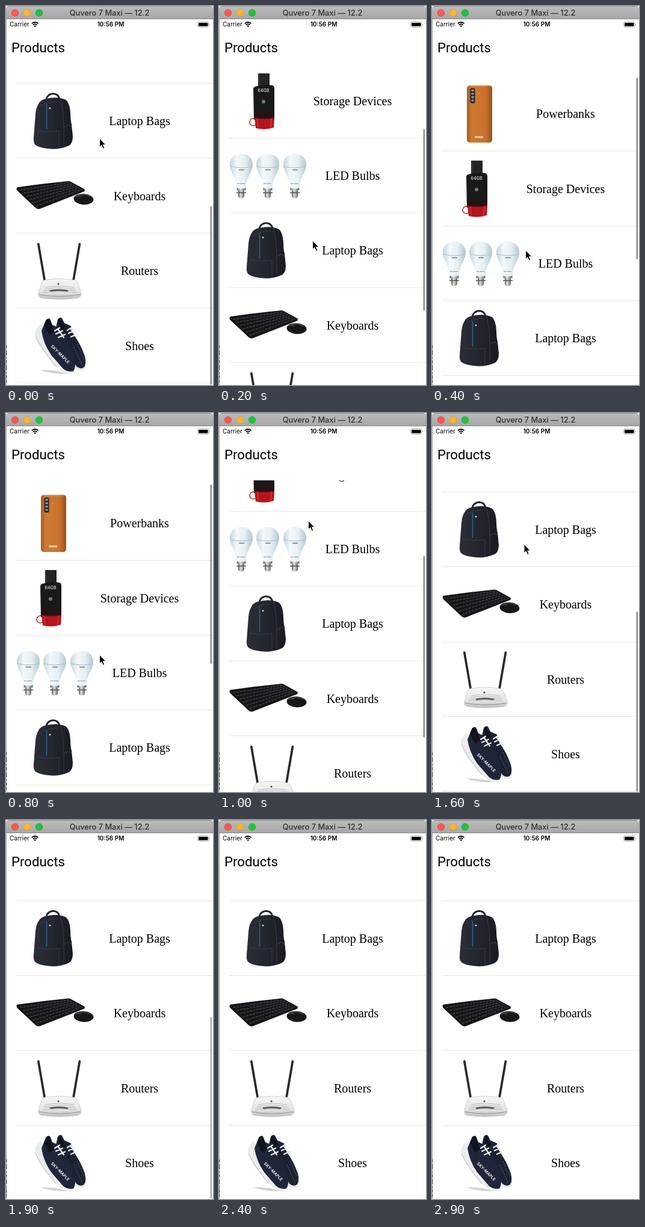
Write an HTML page that moves like this. It is 344x630 px and loops after 3 s.

```html
<!DOCTYPE html>
<html lang="en">
<head>
<meta charset="utf-8">
<title>Product list</title>
<style>
html, body { margin: 0; width: 100%; height: 100%; overflow: hidden; background: #fff; }
svg { display: block; width: 344px; height: 630px; }
.ui { font-family: Inter, Roboto, sans-serif; }
.head { font: 22.2px Roboto, Inter, sans-serif; }
.label { font: 20px "Liberation Serif", "Noto Serif", serif; text-anchor: middle; }
</style>
</head>
<body>
<svg id="stage" viewBox="0 0 344 630">
  <defs>
    <clipPath id="view"><rect x="0" y="112" width="344" height="518"/></clipPath>
    <linearGradient id="bar" x2="0" y2="1"><stop stop-color="#bcbcbc"/><stop offset="1" stop-color="#a6a6a6"/></linearGradient>
    <linearGradient id="copper"><stop stop-color="#a95b20"/><stop offset=".2" stop-color="#cf7a34"/><stop offset=".75" stop-color="#c8712c"/><stop offset="1" stop-color="#97501c"/></linearGradient>
    <linearGradient id="glass"><stop stop-color="#c3d3dc"/><stop offset=".3" stop-color="#f3f8fa"/><stop offset=".65" stop-color="#e6eff3"/><stop offset="1" stop-color="#b4c6d0"/></linearGradient>
    <linearGradient id="metal"><stop stop-color="#5d5d5d"/><stop offset=".4" stop-color="#e2e2e2"/><stop offset="1" stop-color="#636363"/></linearGradient>
    <linearGradient id="cloth"><stop stop-color="#2b2d37"/><stop offset=".5" stop-color="#23252f"/><stop offset="1" stop-color="#191a21"/></linearGradient>
    <linearGradient id="shell" x2="0" y2="1"><stop stop-color="#f6f6f6"/><stop offset=".65" stop-color="#e4e4e4"/><stop offset="1" stop-color="#bdbdbd"/></linearGradient>
  </defs>
  <rect width="344" height="630" fill="#fff"/>
  <g clip-path="url(#view)"><g id="list"></g></g>
  <rect id="thumb" x="339.5" width="2.6" rx="1.3" fill="#8c8c8c"/>

  <path d="M0.5 22V630" stroke="#a2a2a2"/>
  <path d="M0.5 564V626" stroke="#2b2b2b" stroke-dasharray="5 3 8 4 2 3"/>
  <path d="M0 22V5Q0 0 5 0H339Q344 0 344 5V22Z" fill="url(#bar)"/>
  <path d="M4 .5H340" stroke="#8d8d8d"/>
  <path d="M0 21.5H344" stroke="#8b8b8b"/>
  <g stroke-width=".6">
    <circle cx="15" cy="11.5" r="5.8" fill="#fc554f" stroke="#d8423d"/>
    <circle cx="35" cy="11.5" r="5.8" fill="#fdb52a" stroke="#d99720"/>
    <circle cx="55" cy="11.5" r="5.8" fill="#1fc13c" stroke="#1aa232"/>
  </g>
  <g class="ui">
    <text x="172" y="16" font-size="12.8" font-weight="500" fill="#303030" text-anchor="middle">Quvero 7 Maxi — 12.2</text>
    <text x="6" y="34" font-size="10">Carrier</text>
    <text x="174" y="34" font-size="10" font-weight="600" text-anchor="middle">10:56 PM</text>
  </g>
  <g fill="none" stroke="#000" stroke-width="1.7">
    <path d="M42.8 29.2Q48.2 24.8 53.6 29.2M44.8 31.5Q48.2 28.7 51.6 31.5"/>
  </g>
  <path d="M46.3 32.9Q48.2 31.5 50.1 32.9L48.2 35Z"/>
  <rect x="318.5" y="26.5" width="18.5" height="8.5" rx="2.4" fill="none" stroke="#8a8a8a" stroke-width=".8"/>
  <rect x="320" y="28" width="15.5" height="5.5" rx="1.2"/>
  <path d="M338.2 29.3Q340 30.7 338.2 32.1Z" fill="#8a8a8a"/>
  <text class="head" x="9" y="77">Products</text>
  <path id="cursor" d="M0 0V14.6L3.3 11.6L5.8 17.2L8.2 16.2L5.8 10.7H10.4Z" stroke="#fff" stroke-width="1"/>
</svg>
<script>
const LOOP = 3000, TICK = 100;
const PITCH = 124.4;
const TOP = 241, BOTTOM = -114.5;   // resting limits of the first divider
const $ = id => document.getElementById(id);
const range = n => [...Array(n).keys()];
const mix = (a, b, k) => a + (b - a) * k;

const powerbank = () => `
  <rect x="58" y="15.5" width="42" height="95" rx="5" fill="url(#copper)"/>
  <path d="M62 16.6H96" stroke="#e0a068"/>
  <rect x="63.5" y="20" width="8" height="25" rx="2.5" fill="#25201f"/>
  ${range(4).map(i => `<rect x="65.2" y="${22 + i * 5.6}" width="4.6" height="3.4" rx=".8" fill="#8094a6"/>`).join("")}
  <circle cx="78" cy="29" r=".8" fill="#e9b588"/>
  <rect x="71" y="99.5" width="14" height="3.4" fill="#eed0b2" opacity=".85"/>`;

const flashDrive = () => `
  <circle cx="57" cy="98" r="6" fill="none" stroke="#bc343a" stroke-width="1.7"/>
  <path d="M65 16H84V39H65Z" fill="#242424"/>
  <path d="M67 17V38" stroke="#444"/>
  <path d="M60 39Q74 34 89 37Q92 38 92 42L92 94H58L57 43Q57 40 60 39Z" fill="#19191b"/>
  <path d="M59 91Q75 87 92 90L91 107Q76 112 61 108Z" fill="#b5141c"/>
  <path d="M60 81L91 80L91 91Q75 94 60 91Z" fill="#241315"/>
  <path d="M64 93L65 107M87 92L86 108" stroke="#e0383c" stroke-width="1.3"/>
  <text class="ui" x="74" y="48" font-size="7" font-weight="600" fill="#c5c5c5" text-anchor="middle">64GB</text>
  <circle cx="74" cy="64" r="3" fill="#77777a"/>`;

const bulb = x => `<g transform="translate(${x} 0)">
  <path d="M-5 85H5V96Q5 100 0 100Q-5 100 -5 96Z" fill="url(#metal)"/>
  <path d="M-7.5 82H7.5V87H-7.5Z" fill="url(#metal)"/>
  <path d="M-8 91H8" stroke="#555" stroke-width="1.6"/>
  <path d="M0 26C12 26 19 34 19 44C19 57 9 63 7.5 83Q0 85 -7.5 83C-9 63 -19 57 -19 44C-19 34 -12 26 0 26Z" fill="url(#glass)"/>
  <path d="M-18.5 47Q0 52 18.5 47" stroke="#a9bcc7" fill="none"/>
  <path d="M-4 53H5" stroke="#6b7e8c" stroke-width="1.6"/>
  <path d="M-7 76H8" stroke="#8fa3ae" stroke-width="1.4" stroke-dasharray="4 1 8"/>
</g>`;

const bulbs = () => [37, 81, 126].map(bulb).join("");

const bag = () => `
  <path d="M67 26Q69 18 78 17Q87 17 89 26" fill="none" stroke="#23252e" stroke-width="3"/>
  <path d="M54 34Q57 27 68 25Q86 21 99 27Q106 32 107 50Q107 61 109 68L111 88Q111 101 103 104Q91 109 78 109Q58 108 50 103Q45 100 46 90L49 51Q50 40 54 34Z" fill="url(#cloth)"/>
  <path d="M90 25Q97 45 96 103M51 78Q69 82 88 79V107M57 38Q67 30 86 30" fill="none" stroke="#3a3c47" stroke-width="1"/>
  <path d="M96 73Q103 66 109 72" fill="none" stroke="#42444f"/>
  <path d="M67.5 34V76" stroke="#23638c" stroke-width="1.7"/>
  <circle cx="73" cy="41" r="1.5" fill="#c5ccd4"/>`;

function keyRow(i) {
  const k = (i + 0.7) / 6.2;
  const from = [mix(20, 53, k), mix(49, 82, k)];
  const to = [mix(103, 128, k), mix(38.5, 53, k)];
  return `<path d="M${from}L${to}" stroke="#35353b" stroke-width="2.2" stroke-dasharray="4.2 1.4"/>`;
}

const keyboard = () => `
  <path d="M19 48Q60 42 102 38Q105 37.5 108 39L130 51Q132 53 130 55L56 84Q53 85 50 83L19 54Q16 50 19 48Z" fill="#151518"/>
  ${range(6).map(keyRow).join("")}
  <g transform="rotate(4 129 68)">
    <ellipse cx="129" cy="68" rx="16.5" ry="9" fill="#17171a"/>
    <path d="M115 65Q127 57 140 63" fill="none" stroke="#505055" stroke-width="1.2"/>
    <ellipse cx="122" cy="63.5" rx="3.5" ry="1.2" fill="#3a3a3e"/>
  </g>`;

const antenna = (x, lean) => `
  <path d="M${x} 18L${x + lean * 10.5} 79" stroke="#29292b" stroke-width="3.7" stroke-linecap="round"/>`;

const router = () => `
  ${antenna(53.8, 1)}${antenna(122.4, -1)}
  <path d="M64 78Q88 74 113 78Q117 79 119 83L125 99Q126 106 119 108Q88 112 59 108Q52 106 54 99L59 83Q60 79 64 78Z" fill="url(#shell)" stroke="#c4c4c4" stroke-width=".8"/>
  <path d="M55 102Q88 108 124 102" fill="none" stroke="#8f8f8f"/>
  ${range(4).map(i => `<path d="M${65 - i * 1.6} ${90 + i * 3}Q88 ${86 + i * 3} ${113 + i * 1.6} ${90 + i * 3}" fill="none" stroke="#b8b8b8" stroke-width=".9"/>`).join("")}
  <path d="M72 95Q88 91.5 104 95L102 97.5Q88 95 74 97.5Z" fill="#58585a"/>
  <circle cx="87" cy="84.5" r="1.6" fill="#555"/>`;

const laces = (x, y) => `
  <g transform="translate(${x} ${y})" stroke="#efefef" stroke-width="2.2" stroke-linecap="round">
    <path d="M0 5L8 0M2 10L13 5M6 16L17 11M6 3L15 16"/>
  </g>`;

const shoes = () => `
  <path d="M57 103Q80 102 104 109Q78 111 57 103Z" fill="#d2d2d4"/>
  <path d="M86 28L94 52L116 100Q124 107 131 102L133 95L120 62Z" fill="#e6e6e8"/>
  <path d="M83 32L86 19Q89 14 93 17L97 25L108 30L113 45Q124 60 131 80Q134 92 130 98Q124 103 117 97L100 68Z" fill="#1d2233"/>
  <path d="M58 27Q48 33 48 44Q51 57 62 71L84 97Q95 109 108 109Q115 108 114 100L84 62Z" fill="#ececee"/>
  <path d="M49 46Q56 65 83 97" fill="none" stroke="#c6c6ca" stroke-width="1.2"/>
  <path d="M59 38L66 21Q69 16 73 18L77 28L90 34L97 49Q109 65 114 84Q117 98 112 105Q103 107 95 101L75 78Q62 59 59 38Z" fill="#20263a"/>
  <path d="M63 29L67 19L73 19L80 39L72 46Z" fill="#12141d"/>
  <path d="M86 23L90 18L98 31L94 40Z" fill="#12141d"/>
  ${laces(81, 33)}${laces(102, 32)}
  <path d="M118 60L130 86M113 66L127 96" stroke="#555e76" stroke-width="1.1" stroke-dasharray="2 2"/>
  <text class="ui" transform="translate(74 64) rotate(45)" font-size="6.8" font-weight="700" fill="#e6e6e6">SKY-MAPLE</text>`;

const products = [
  ["Powerbanks", powerbank],
  ["Storage Devices", flashDrive],
  ["LED Bulbs", bulbs],
  ["Laptop Bags", bag],
  ["Keyboards", keyboard],
  ["Routers", router],
  ["Shoes", shoes]
];

$("list").innerHTML = products.map(([name, draw], i) => `
  <g transform="translate(0 ${(i - 1) * PITCH})">
    ${draw()}
    <text class="label" x="222" y="69.5">${name}</text>
    <path d="M17 ${PITCH}H344" stroke="#e6e6e6"/>
  </g>`).join("");

// [time, divider position]
const scroll = [
  [0, -120], [100, -28], [200, 95], [300, 196], [400, 241], [500, 262], [600, 261],
  [700, 252], [800, 245], [900, 150], [1000, 39], [1100, -90], [1200, -150],
  [1300, -141], [1400, -130], [1500, -122], [1600, -117.5], [1700, -115.3], [1800, BOTTOM]
];
// [time, x, y]
const pointer = [
  [0, 155.5, 220], [200, 155.5, 390], [400, 155.5, 406], [800, 155.5, 402],
  [1000, 148.5, 179], [1300, 151.5, 217], [1800, 154, 219]
];

function sample(keys, t, col = 1) {
  const n = keys.findIndex(k => k[0] > t);
  if (n < 0) return keys[keys.length - 1][col];
  const a = keys[n - 1], b = keys[n];
  return mix(a[col], b[col], (t - a[0]) / (b[0] - a[0]));
}

function drawThumb(y, t) {
  const over = Math.max(0, y - TOP, BOTTOM - y);
  const inside = Math.min(TOP, Math.max(BOTTOM, y));
  const top = 119 + (TOP - inside) * 0.586 + (y < BOTTOM ? over : 0);
  $("thumb").setAttribute("y", top);
  $("thumb").setAttribute("height", 302 - over);
  $("thumb").setAttribute("opacity", Math.max(0, Math.min(1, (2100 - t) / 280)));
}

function render(ms) {
  const t = Math.floor(ms % LOOP / TICK) * TICK;
  const y = sample(scroll, t);
  $("list").setAttribute("transform", `translate(0 ${y})`);
  drawThumb(y, t);
  $("cursor").setAttribute("transform", `translate(${sample(pointer, t)} ${sample(pointer, t, 2)})`);
  $("cursor").setAttribute("visibility", t < 1900 ? "visible" : "hidden");
}

const start = performance.now();
function loop() {
  render(performance.now() - start);
  requestAnimationFrame(loop);
}
loop();
</script>
</body>
</html>
```
